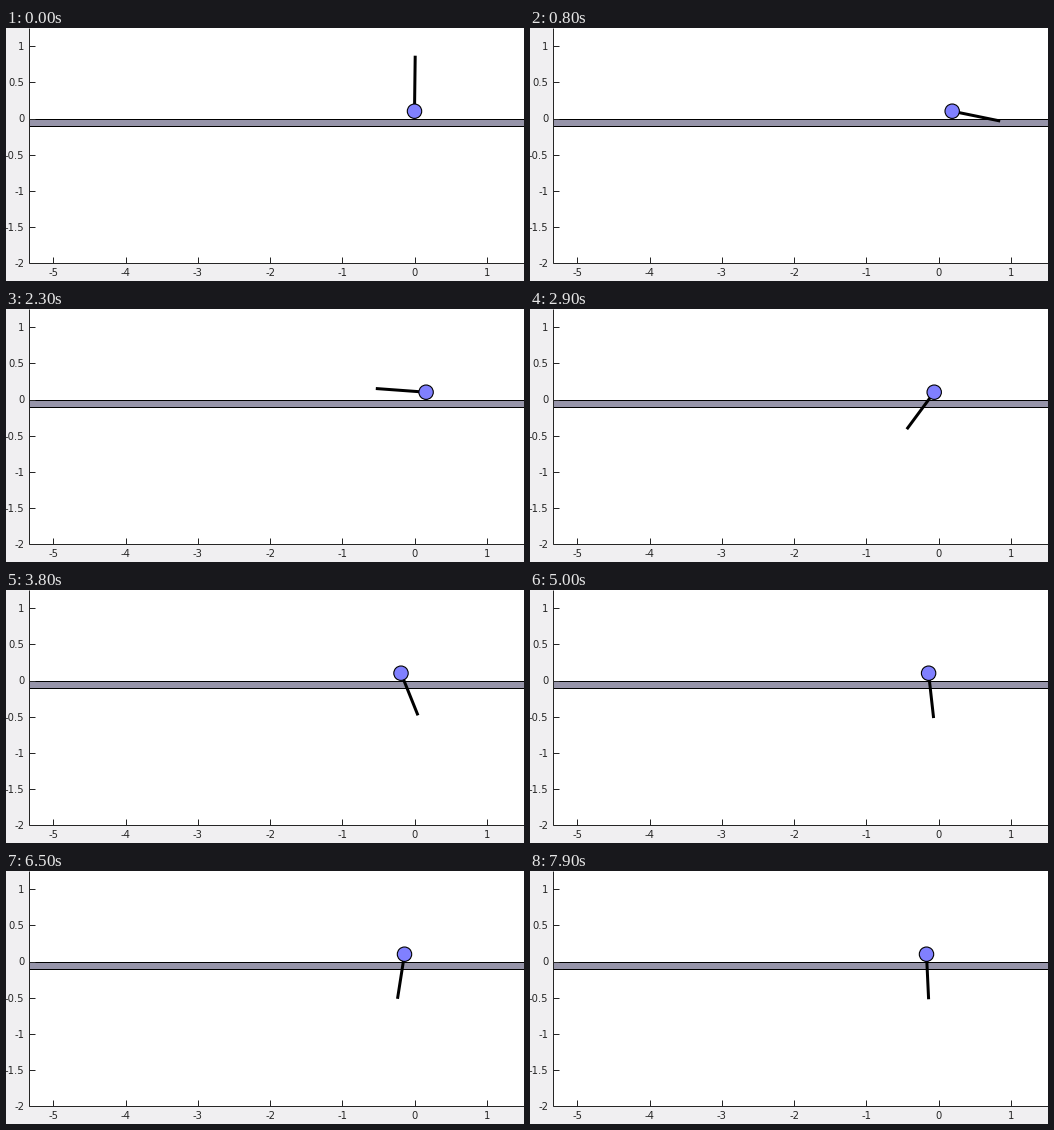
Write a matplotlib script that moves like this. It is 518 by 253 pixels and loops after 8 s.

```python
import numpy as np
import matplotlib.pyplot as plt
from matplotlib.animation import FuncAnimation
from matplotlib.patches import Circle, Rectangle

W, H, DPI = 518, 253, 64           # power-of-two dpi keeps the size exact
FRAMES, STEP = 80, 100
PX = 72 / DPI                      # one pixel in points
X0, Y0, UNIT = 408.7, 90.5, 72.25  # data origin and scale in pixels
LEFT, BOTTOM = 22.5, 235
BOB_Y, PIVOT_Y, POLE = 83.2, 78, 50.3
INK = "#262626"

# time (s), cart position (px), clockwise angle from upright (deg)
KEYS = np.array([
    (0.0, 408.5, 0.8), (0.4, 411.5, 46), (0.7, 419, 89), (0.9, 425.3, 127),
    (1.16, 431, 180), (1.4, 432.8, 225), (1.6, 431.7, 253), (1.8, 430, 269),
    (2.0, 426.5, 275), (2.2, 422.3, 272.5), (2.4, 417.7, 262),
    (2.7, 409, 231), (2.9, 404.2, 213), (3.2, 398.3, 188),
    (3.5, 395.5, 170), (3.8, 395, 160.3), (4.1, 395.2, 157.5),
    (4.5, 396.4, 163), (5.0, 398.6, 174.3), (5.4, 399.5, 182.5),
    (5.8, 399.6, 187.2), (6.2, 399, 188.9), (6.5, 398.5, 188),
    (7.2, 397.1, 181), (7.9, 396.5, 177.6),
])
TIMES = KEYS[:, 0]
POSE = KEYS[:, 1:]
SLOPE = np.gradient(POSE, TIMES, axis=0)


def pose(t):
    """Cubic Hermite interpolation of cart position and angle."""
    i = int(np.clip(np.searchsorted(TIMES, t, "right") - 1, 0, len(TIMES) - 2))
    h = TIMES[i + 1] - TIMES[i]
    s = (t - TIMES[i]) / h
    a = 2 * s**3 - 3 * s**2 + 1
    b = s**3 - 2 * s**2 + s
    c = s**3 - s**2
    return (a * POSE[i] + (1 - a) * POSE[i + 1]
            + h * (b * SLOPE[i] + c * SLOPE[i + 1]))


fig = plt.figure(figsize=(W / DPI, H / DPI), dpi=DPI, facecolor="#f0eff1")
ax = fig.add_axes([0, 0, 1, 1])
ax.set(xlim=(0, W), ylim=(H, 0))
ax.axis("off")


def line(xs, ys, width=1, color=INK, z=2):
    return ax.plot(xs, ys, color=color, lw=width * PX, zorder=z,
                   solid_capstyle="butt")[0]


def label(x, y, text, align):
    ax.text(x, y, text, ha=align, va="baseline", color=INK,
            family="DejaVu Sans", size=10 * PX)


ax.add_patch(Rectangle((LEFT, 0), W - LEFT, BOTTOM, fc="white", lw=0, zorder=0))
ax.add_patch(Rectangle((LEFT, Y0), W, 7, fc="#9694a9", ec="black",
                       lw=PX, zorder=1))
line([LEFT, LEFT], [0, BOTTOM])
line([LEFT, W], [BOTTOM, BOTTOM])

for v in np.arange(-2, 1.5, 0.5):
    y = Y0 - v * UNIT
    line([LEFT, LEFT + 6], [y, y])
    label(18.5, y + 4, f"{v:g}", "right")
for v in range(-5, 2):
    x = X0 + v * UNIT
    line([x, x], [BOTTOM, BOTTOM - 6])
    label(x, 248, str(v), "center")

pole = line([], [], 3, "black", 3)
bob = ax.add_patch(Circle((X0, BOB_Y), 7.2, fc="#8080ff", ec="black",
                          lw=1.1 * PX, zorder=4))


def draw(frame):
    x, deg = pose(frame * STEP / 1000)
    a = np.radians(deg)
    pole.set_data([x, x + POLE * np.sin(a)],
                  [BOB_Y, PIVOT_Y - POLE * np.cos(a)])
    bob.center = x, BOB_Y
    return pole, bob


anim = FuncAnimation(fig, draw, frames=FRAMES, interval=STEP,
                     repeat=True, repeat_delay=0)
plt.show()
```
